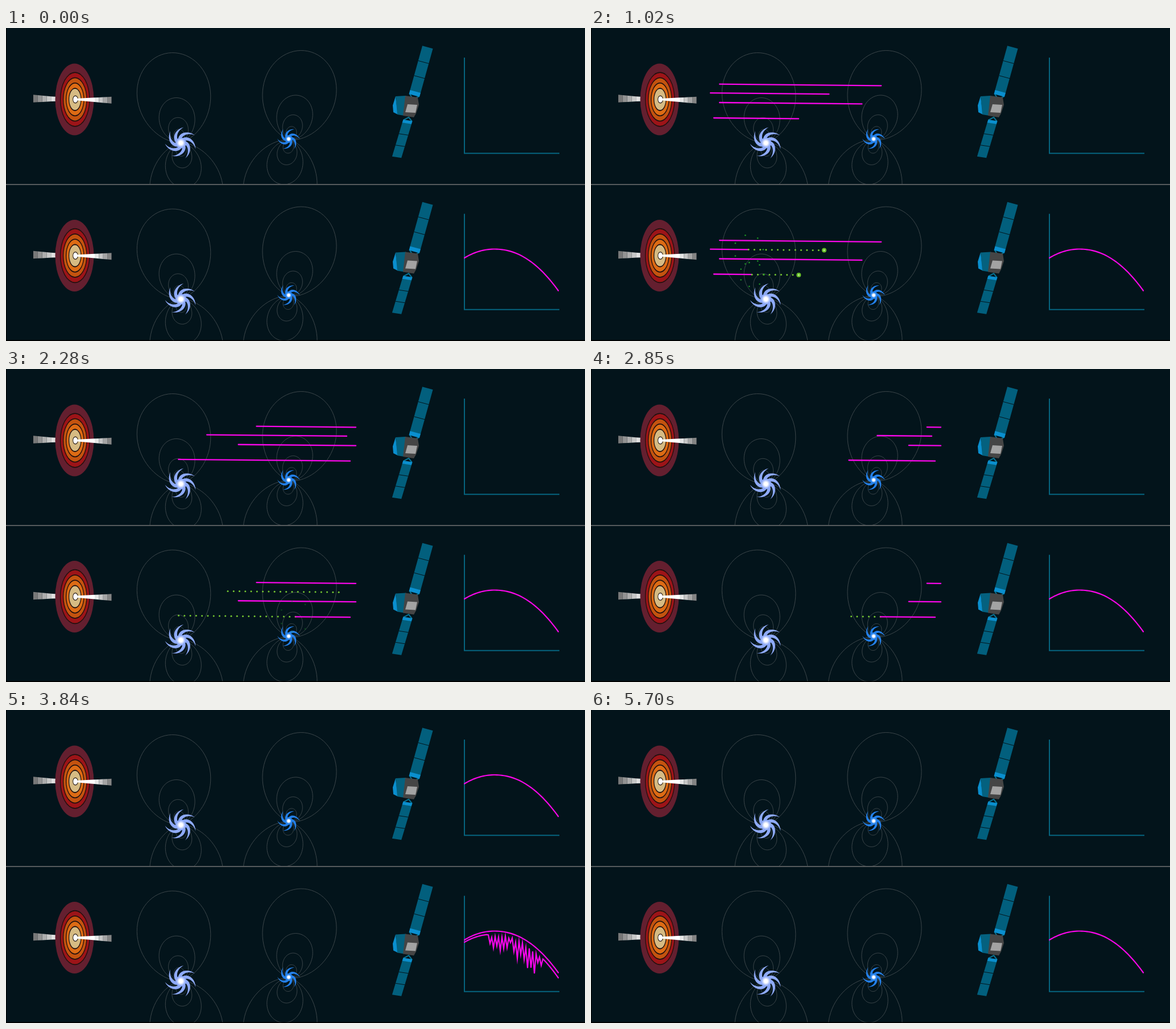
Recreate the animation shown at these times as an HTML page with a canvas. Size 1018 px wide and 550 px high, loop 5.76 s.

```html
<!DOCTYPE html>
<html lang="en">
<head>
<meta charset="utf-8">
<title>Light rays through galaxy fields</title>
<style>
html, body { margin: 0; width: 100%; height: 100%; overflow: hidden; background: #000; }
canvas { display: block; }
</style>
</head>
<body>
<canvas id="stage" width="1018" height="550"></canvas>
<script>
const ctx = document.getElementById('stage').getContext('2d');
const LOOP = 5760, STEP = 30, PANEL = 274.5, RAD = Math.PI / 180;
const SPACE = '#03141b', MAGENTA = '#fa06ea', GREEN = '#76c832', TEAL = '#025f7d', SKY = '#0a8fcf';
const HEAD_SPEED = 0.28, TAIL_SPEED = 0.2635, TAIL_DELAY = 1461, RAY_LENGTH = 389, DOT_GAP = 10.27;

// Rays; between `from` and `to` the scattered ones travel as a dotted particle.
const rays = [
  { x: 226, y: 98.6, start: 5 },
  { x: 210, y: 114.2, start: 276, from: 277, to: 585, speed: 0.2634, wipe: 1.45 },
  { x: 226, y: 131, start: 126 },
  { x: 216, y: 158, start: 488, from: 283, to: 509, speed: 0.281, wipe: 1, returns: true }
];

const clamp = v => Math.max(0, Math.min(1, v));
const mix = (a, b, u) => a + (b - a) * u;
const random = i => { const v = Math.sin(i * 12.9898) * 43758.5453; return v - Math.floor(v); };

function trace(points) {
  ctx.beginPath();
  points.forEach(p => ctx.lineTo(...p));
}

function fill(color, points) {
  ctx.fillStyle = color;
  trace(points);
  ctx.fill();
}

function stroke(color, width, points) {
  ctx.strokeStyle = color;
  ctx.lineWidth = width;
  trace(points);
  ctx.stroke();
}

function ellipse(color, x, y, rx, ry = rx) {
  ctx.fillStyle = color;
  ctx.beginPath();
  ctx.ellipse(x, y, rx, ry, 0, 0, 2 * Math.PI);
  ctx.fill();
}

// Points of f(u) for u from 0 to 1.
const sample = (n, f) => Array.from({ length: n + 1 }, (_, i) => f(i / n));

// A jet widens away from the core; its slices run through a grey ramp.
function jet(x0, x1, slices, grey0, grey1) {
  const edge = (x, side) => [x, 125.5 + (x - 122) * 0.0204 + side * (1.5 + Math.abs(x - 122) * 0.07)];
  for (let i = 0; i < slices; i++) {
    const a = mix(x0, x1, i / slices), b = mix(x0, x1, (i + 1) / slices);
    const grey = mix(grey0, grey1, slices > 1 ? i / (slices - 1) : 0);
    fill(`rgb(${grey},${grey},${grey})`, [edge(a, -1), edge(b, -1), edge(b, 1), edge(a, 1)]);
  }
}

function quasar() {
  jet(87, 48, 5, 225, 120);
  ellipse('#641f2f', 120.5, 125.5, 34, 63);
  ['#9d1418', '#c4530f', '#dd6b14', '#d6bb83'].forEach((color, i) => {
    const rx = 25 - 5 * i, ry = 46.5 - 9.3 * i;
    ellipse('#21100f', 121.3, 125.5, rx + 1.3, ry + 1.8);
    ellipse(color, 121.3, 125.5, rx, ry);
  });
  ellipse('#2a1d14', 122, 125.5, 4.8, 7);
  ellipse('#fff', 122, 125.5, 3.8, 5.8);
  jet(122, 156, 1, 255, 255);
  jet(156, 185.5, 4, 230, 133);
}

// Dipole-like loops: radius falls off as a power of the cosine from the axis.
function field(x, y, tilt) {
  for (const scale of [1, 0.5, 0.28, 0.15]) {
    for (const side of [1, -1]) {
      stroke('#3c464a', 1, sample(80, u => {
        const angle = (u - 0.5) * 180;
        const r = side * 159 * scale * Math.abs(Math.cos(angle * RAD)) ** (2 - 0.25 * scale);
        return [x + r * Math.sin((angle + tilt) * RAD), y - r * Math.cos((angle + tilt) * RAD)];
      }));
    }
  }
}

// Arms spiral outwards and taper to a point.
function galaxy(x, y, arms, radius, turn, color, core) {
  for (let i = 0; i < arms; i++) {
    const tip = turn + i * 360 / arms;
    const edge = side => u => {
      const r = radius * mix(0.2, 1, u);
      const angle = (tip - 85 * (1 - u) + side * 24 * (1 - u)) * RAD;
      return [x + r * Math.cos(angle), y + r * Math.sin(angle)];
    };
    fill(color, [...sample(12, edge(1)), ...sample(12, edge(-1)).reverse()]);
  }
  ellipse(color, x, y, radius * 0.34);
  const glow = ctx.createRadialGradient(x, y, core * 0.6, x, y, core * 1.6);
  glow.addColorStop(0, '#fff');
  glow.addColorStop(1, 'rgba(255,255,255,0)');
  ellipse(glow, x, y, core * 1.6);
}

// A solar wing in a skewed frame: (ux, uy) runs across it, (vx, vy) along it.
function wing(x, y, ux, uy, vx, vy) {
  const at = (u, v) => [x + u * ux + v * vx, y + u * uy + v * vy];
  const band = (v0, v1) => [at(-0.5, v0), at(0.5, v0), at(0.5, v1), at(-0.5, v1)];
  fill(TEAL, band(0, 1));
  for (const v of [1 / 3, 2 / 3]) stroke(SPACE, 1, [at(-0.5, v), at(0.5, v)]);
  stroke('#08708f', 2.2, [at(-0.45, -0.07), at(0, -0.17), at(0.45, -0.07)]);
  fill(SKY, band(-0.08, 0.01));
}

function satellite() {
  wing(719.5, 112.3, 18.5, 5, 21.8, -78.5);
  wing(705, 167, 16.3, 2.5, -18, 60);
  fill(SKY, [[685, 120], [689, 152], [681, 148], [680, 136]]);
  fill('#04617f', [[685, 120], [703, 119], [700, 154], [688, 152]]);
  fill('#454545', [[702, 119], [724, 122], [726, 135], [721, 150], [717, 157], [698, 154]]);
  fill('#a3a3a3', [[706, 134], [723, 135], [720, 149], [702, 148]]);
}

function lightCurve(x) {
  const d = x - 858;
  return d < 0 ? 114 + 15.5 * (d / 52) ** 2 : 114 + 73 * (d / 113) ** 2.15;
}

// The same curve, slightly dimmed, with random dips in its middle part.
function dippedCurve(x) {
  const i = Math.round((x - 806) / 3), base = lightCurve(x) + mix(4, 9, (x - 806) / 165);
  const inside = clamp((x - 847) / 6) * clamp((946 - x) / 12);
  return base + inside * (i % 2 ? 10 + 32 * random(i) : 6 * random(i));
}

function plot(curve, alpha) {
  ctx.globalAlpha = alpha;
  stroke(MAGENTA, 2.2, sample(55, u => [806 + 165 * u, curve(806 + 165 * u)]));
  ctx.globalAlpha = 1;
}

// Seven specks flying out of a point, slowing down and fading.
function burst(x, y, age) {
  if (age <= 0 || age > 900) return;
  ctx.globalAlpha = clamp((900 - age) / 400);
  for (let i = 0; i < 7; i++) {
    const angle = i / 7 * 2 * Math.PI, r = 28 * (1 - Math.exp(-age / 200));
    ellipse('#1f9426', x + r * Math.cos(angle), y + r * Math.sin(angle), 1.3);
  }
  ctx.globalAlpha = 1;
}

function drawRay(ray, t, scattered) {
  const { x, from, to } = ray;
  const yAt = px => ray.y + (px - x) * 0.0095;
  const head = x + Math.min(RAY_LENGTH, HEAD_SPEED * (t - ray.start));
  const tail = x + Math.max(0, TAIL_SPEED * (t - ray.start - TAIL_DELAY));
  const segment = (a, b) => { if (b > a) stroke(MAGENTA, 2.3, [[a, yAt(a)], [b, yAt(b)]]); };
  if (!scattered || !from) return segment(tail, head);

  const age = px => t - ray.start - (px - x) / HEAD_SPEED;
  const ball = from + ray.speed * age(from);
  const cut = from + (tail - from) * ray.wipe;
  segment(tail, Math.min(head, from));
  for (let px = from; px < to + 1; px += DOT_GAP) {
    if (px <= ball && px >= cut) ellipse(GREEN, px, yAt(px), 1.5);
  }
  burst(from, yAt(from), age(from));
  if (ray.returns) {
    segment(Math.max(tail, to), head);
    burst(to, yAt(to), age(to));
  }
  if (ball > from && ball < to) {
    ellipse('#67bd2a', ball, yAt(ball), 4);
    ellipse('#c4ee9c', ball, yAt(ball), 1.5);
  }
}

function panel(top, t, scattered, resultAlpha) {
  ctx.save();
  ctx.translate(0, top);
  ctx.beginPath();
  ctx.rect(1, 0, 1017, 274);
  ctx.clip();
  ctx.fillStyle = SPACE;
  ctx.fillRect(1, 0, 1017, 274);
  quasar();
  field(306.2, 201.6, -7.5);
  field(499, 196.5, 11.5);
  galaxy(307.5, 202, 7, 28, -80, '#8eaaf8', 5);
  galaxy(497, 195, 6, 20, -58, '#2380ea', 3);
  satellite();
  stroke('#06647f', 2, [[806, 52], [806, 220.3], [973, 220.3]]);
  ctx.lineCap = 'round';
  plot(lightCurve, scattered ? 1 : resultAlpha);
  if (scattered) plot(dippedCurve, resultAlpha);
  rays.forEach(ray => drawRay(ray, t, scattered));
  ctx.restore();
}

function draw(now) {
  const t = Math.floor(now % LOOP / STEP) * STEP;
  const resultAlpha = clamp(Math.min((t - 3570) / 270, (5700 - t) / 180));
  ctx.fillStyle = '#000';
  ctx.fillRect(0, 0, 1018, 550);
  panel(0, t, false, resultAlpha);
  panel(PANEL, t, true, resultAlpha);
  ctx.fillStyle = '#565a5c';
  ctx.fillRect(0, 274, 1018, 2);
}

const origin = performance.now();
function tick() {
  draw(performance.now() - origin);
  requestAnimationFrame(tick);
}
tick();
</script>
</body>
</html>
```
